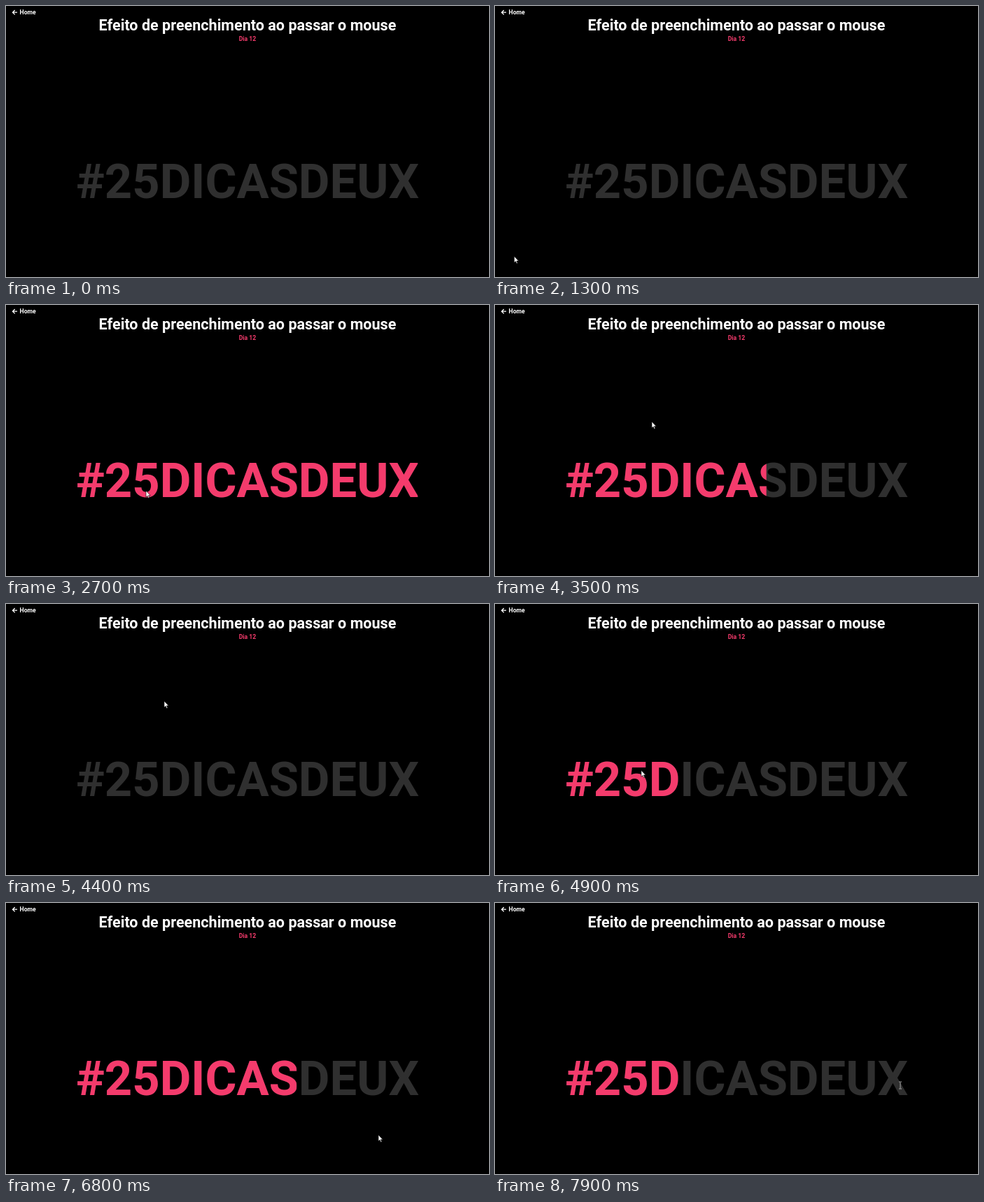
An HTML page that plays this animation: 690 px wide and 388 px high, repeating every 8 s.

```html
<!DOCTYPE html>
<html lang="pt-BR">
<head>
<meta charset="utf-8">
<title>Efeito de preenchimento</title>
<style>
  html, body { margin: 0; width: 100%; height: 100%; overflow: hidden; background: #000; }
  svg { display: block; width: 690px; height: 388px; }
  text { font-family: Roboto, sans-serif; font-weight: 700; fill: #fff; }
  .mid { text-anchor: middle; }
  .title { font-size: 21.57px; }
  .small { font-size: 8.63px; }
  .big { font-size: 68.7px; }
  .big.base { fill: #2f2f2f; }
  .pink { fill: #f43b6c; }
</style>
</head>
<body>
<svg viewBox="0 0 690 388">
  <defs>
    <clipPath id="clip"><rect id="fill" x="90" y="200" width="0" height="100"/></clipPath>
  </defs>
  <rect width="690" height="388"/>
  <path d="M16 9.2H9.8M12.7 6 9.5 9.2l3.2 3.2" fill="none" stroke="#fff" stroke-width="1.3"/>
  <text class="small" x="19.6" y="12.3">Home</text>
  <text class="mid title" x="345" y="35">Efeito de preenchimento ao passar o mouse</text>
  <text class="mid small pink" x="345" y="50.2">Dia 12</text>
  <text class="mid big base" x="345" y="274.5">#25DICASDEUX</text>
  <g clip-path="url(#clip)"><text class="mid big pink" x="345" y="274.5">#25DICASDEUX</text></g>
  <path id="arrow" d="M0 0V9.1L2.1 7.2 3.5 10.4 4.9 9.8 3.5 6.7H6.3Z" fill="#fff" stroke="#000" stroke-width=".6"/>
  <path id="beam" d="M-2-5H-.6L0-4.5.6-5H2M0-4.5V4.5M-2 5H-.6L0 4.5.6 5H2" fill="none" stroke="#b4b4b4" stroke-width=".9"/>
</svg>
<script>
const LOOP = 8000, STEP = 100, FADE = 600;
const LEFT = 102, RIGHT = 588, TOP = 210, BOTTOM = 291;
const $ = id => document.getElementById(id);

// where the pointer turns or rests: time, x, y
const path = [
  [1100, 10, 363], [1900, 156, 313], [2270, 200, 266], [3050, 200, 266],
  [3500, 224, 167], [3950, 226, 86], [4400, 226, 139], [5200, 201, 270],
  [6050, 201, 270], [6800, 532, 332], [7200, 612, 372], [7400, 637, 357],
  [7900, 579, 261]
];

// the pointer enters and leaves the text in turn
const hovers = [2104, 3349, 4770, 6664, 7770];

// smooth slope through a key point, flat at turns and rests
function slope(i, k) {
  const a = path[i - 1], b = path[i], c = path[i + 1];
  if (!a || !c) return 0;
  const d1 = (b[k] - a[k]) / (b[0] - a[0]), d2 = (c[k] - b[k]) / (c[0] - b[0]);
  return d1 * d2 > 0 ? 2 * d1 * d2 / (d1 + d2) : 0;
}

function pointer(t) {
  if (t < path[0][0]) return null;
  const i = path.findIndex(p => p[0] > t) - 1;
  if (i < 0) return path[path.length - 1].slice(1);
  const a = path[i], b = path[i + 1], h = b[0] - a[0], u = (t - a[0]) / h, v = 1 - u;
  return [1, 2].map(k =>
    v * v * (1 + 2 * u) * a[k] + u * u * (3 - 2 * u) * b[k] +
    h * u * v * (v * slope(i, k) - u * slope(i + 1, k)));
}

// the CSS "ease" curve: cubic-bezier(.25, .1, .25, 1)
function ease(x) {
  if (x <= 0) return 0;
  if (x >= 1) return 1;
  const bez = (p, q, s) => 3 * p * s * (1 - s) ** 2 + 3 * q * s * s * (1 - s) + s ** 3;
  let lo = 0, hi = 1;
  for (let n = 0; n < 24; n++) {
    const s = (lo + hi) / 2;
    if (bez(.25, .25, s) < x) lo = s; else hi = s;
  }
  return bez(.1, 1, lo);
}

// each hover adds the fill, each leave takes it away again
const filled = t => hovers.reduce(
  (sum, at, i) => sum + (i % 2 ? -1 : 1) * ease((t - at) / FADE), 0);

function place(el, pos, on) {
  el.style.display = on ? "" : "none";
  if (on) el.setAttribute("transform", `translate(${pos[0]} ${pos[1]})`);
}

function draw(t) {
  const edge = LEFT + filled(t) * (RIGHT - LEFT), pos = pointer(t);
  $("fill").setAttribute("width", edge - 90);
  const overText = pos && pos[1] > TOP && pos[1] < BOTTOM &&
    pos[0] > edge && pos[0] < RIGHT;
  place($("arrow"), pos, pos && !overText);
  place($("beam"), pos, overText);
}

const start = performance.now();
function tick() {
  const t = (performance.now() - start) % LOOP;
  draw(Math.floor(t / STEP) * STEP);
  requestAnimationFrame(tick);
}
tick();
</script>
</body>
</html>
```
